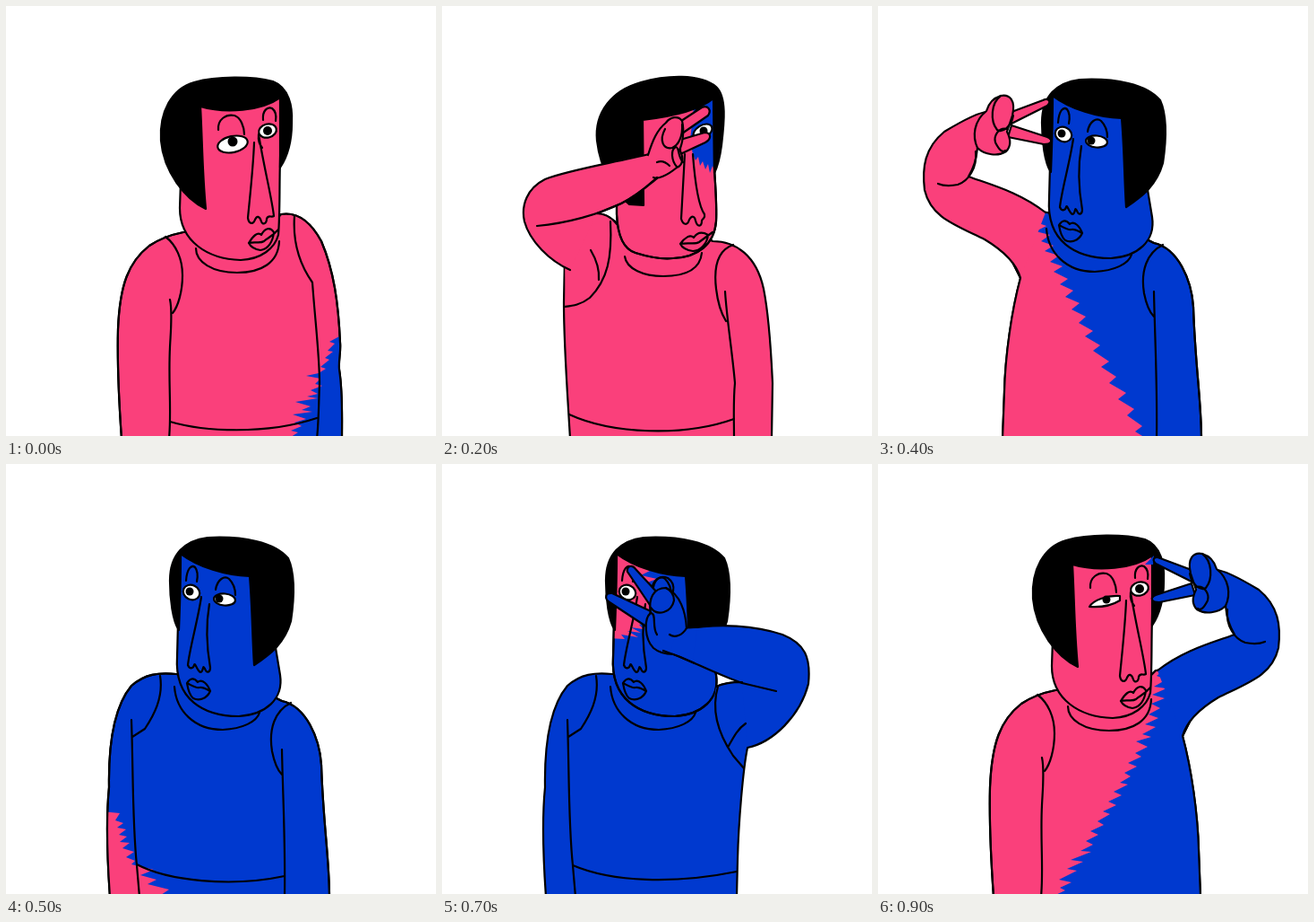
Animation, 480 px wide and 479 px high, one loop 1 s. Source, as an HTML page:

```html
<!DOCTYPE html>
<html lang="en">
<head>
<meta charset="utf-8">
<title>Two-tone salute</title>
<style>
html, body { margin: 0; width: 100%; height: 100%; overflow: hidden; background: #fff; }
svg { display: block; width: 100%; height: 100%; stroke: #000; stroke-width: 2.2; stroke-linecap: round; stroke-linejoin: round; }
.p { fill: #fa407b; }
.b { fill: #0039cf; }
.l { fill: none; }
.n { stroke: none; }
.w { fill: #fff; }
.k { fill: #000; }
.pose { visibility: hidden; animation: show 1s step-end infinite; animation-delay: calc(var(--i) * 100ms - 1s); }
@keyframes show {
  0% { visibility: visible; }
  10%, 100% { visibility: hidden; }
}
</style>
</head>
<body>
<svg viewBox="0 0 480 479" preserveAspectRatio="none">
<defs>
  <!-- torsos -->
  <path id="restR" d="M129 482C126 440 124 400 125 360C127 310 137 285 160 267C172 259 188 254 198 252L230 250 290 250 307 232C325 229 340 240 352 262C366 295 371 330 373 375C374 385 371 395 372 405C376 430 375 455 375 482Z"/>
  <path id="restL" d="M116 482C113 440 111 400 115 360C114 300 125 265 140 247C155 234 170 232 190 234L230 240 290 255 308 264C335 270 350 305 352 335C354 400 361 440 361 482Z"/>
  <path id="openR" d="M129 482C126 440 124 400 125 360C127 310 137 285 160 267C172 259 188 254 198 252L230 250 290 250 310 230 345 227 350 283 340 303C350 340 357 390 358 430L360 482Z"/>
  <path id="openL" d="M139 482L141 430C142 390 149 340 159 303L149 283 154 227 189 230 230 240 290 255 308 264C335 270 350 305 352 335C354 400 361 440 361 482Z"/>
  <path id="frontP" d="M143 482L142 325C142 303 136 284 118 266C100 250 75 244 55 232C35 218 15 196 8 175C-1 150 5 140 30 139C70 140 110 152 140 156L139 188C130 197 115 203 100 205C130 202 165 212 195 243L230 250 285 250 300 262C325 259 352 276 358 318C365 365 368 420 371 482Z"/>
  <path id="frontB" d="M118 482C114 440 114 400 116 345C118 300 130 270 160 254C175 249 188 248 195 247L230 250 285 240 305 244C320 232 345 212 398 207C378 205 360 200 343 192L352 153C390 145 440 140 465 155C480 170 478 200 470 220C455 255 420 270 390 288C365 300 352 310 352 330L350 358V482Z"/>
  <!-- faces -->
  <path id="faceR" d="M195 195L194 225C194 262 225 282 262 283C285 282 300 270 304 255C306 230 305 205 306 170L308 100 215 105Z"/>
  <path id="faceL" d="M194 100L191 215C188 262 220 281 260 281C290 279 310 262 306 235L301 205 272 105Z"/>
  <path id="faceT" d="M224 115L195 190V232C196 255 203 271 216 275C235 281 248 282 258 281C285 280 304 266 306 240C307 220 305 200 304 180V100Z"/>
  <path id="faceP" d="M201 105L195 205V230C196 254 205 272 225 277C235 280 245 280 255 280C290 278 307 258 307 235L302 200 296 110Z"/>
  <path id="faceB" d="M201 102L194 205C193 255 205 281 250 282C290 281 305 258 305 235V200L298 105Z"/>
  <clipPath id="cRestR"><use href="#restR"/></clipPath>
  <clipPath id="cRestL"><use href="#restL"/></clipPath>
  <clipPath id="cOpenR"><use href="#openR"/></clipPath>
  <clipPath id="cOpenL"><use href="#openL"/></clipPath>
  <clipPath id="cFrontP"><use href="#frontP"/></clipPath>
  <clipPath id="cFrontB"><use href="#frontB"/></clipPath>
  <clipPath id="cFaceL"><use href="#faceL"/></clipPath>
  <clipPath id="cFaceT"><use href="#faceT"/></clipPath>
  <clipPath id="cFaceP"><use href="#faceP"/></clipPath>
  <clipPath id="cFaceB"><use href="#faceB"/></clipPath>

  <!-- head turned right, left eye left out -->
  <g id="headR">
    <path class="k" d="M223 226C200 215 176 185 173 150C171 118 185 92 210 85C235 78 275 78 298 84C316 91 320 112 319 130C319 150 314 168 306 180V102C285 117 245 120 217 112C219 145 219 185 223 226Z"/>
    <path class="l" d="M237 138C236 126 246 120 255 122C262 124 266 135 266 143M287 127C286 116 292 112 297 114C301 117 302 122 301 128"/>
    <path class="l" d="M277 152C276 180 272 215 270 236C271 243 276 244 278 238C280 233 283 234 285 240C286 244 291 243 291 237C293 232 296 236 299 234C297 215 288 180 282 143Q281 152 286 158"/>
    <path class="l" d="M271 264C276 256 281 251 285 255C289 247 295 246 299 252C298 262 293 271 284 272C277 271 273 268 271 264C278 262 284 265 288 262C292 258 296 258 304 249"/>
    <ellipse class="w" cx="292" cy="139" rx="10" ry="7.5" transform="rotate(-15 292 139)"/>
    <circle class="k n" cx="292" cy="139" r="5"/>
  </g>
  <g id="wideR">
    <ellipse class="w" cx="253" cy="154" rx="17" ry="9" transform="rotate(-12 253 154)"/>
    <circle class="k n" cx="253" cy="151" r="5.5"/>
  </g>
  <g id="headL">
    <path class="k" d="M277 224C275 195 275 160 272 125C245 124 215 115 195 100C195 130 194 160 193 185C186 175 183 150 183 130C183 100 200 85 225 82C265 80 300 87 315 105C324 125 321 155 318 175C311 200 295 212 277 224Z"/>
    <path class="l" d="M201 130C202 116 207 112 211 115C215 120 214 126 213 131M234 140C236 128 244 124 249 128C254 133 256 140 256 146"/>
    <path class="l" d="M218 148C214 175 205 205 203 224C205 229 209 228 210 224C211 220 213 230 217 232C221 232 219 222 222 228C224 234 228 232 228 227C225 210 222 185 227 156"/>
    <path class="l" d="M202 244C206 238 210 238 214 243C219 239 225 245 228 253C224 262 215 264 209 261C204 257 203 250 202 244C208 247 212 250 216 249C220 248 224 251 228 253"/>
    <ellipse class="w" cx="207" cy="143" rx="9.5" ry="8" transform="rotate(25 207 143)"/>
    <circle class="k n" cx="205" cy="142" r="4.5"/>
    <ellipse class="w" cx="244" cy="151" rx="12" ry="6.5" transform="rotate(5 244 151)"/>
    <circle class="k n" cx="238" cy="150" r="4.5"/>
  </g>

  <!-- shirt and sleeve lines -->
  <g id="linesR">
    <path d="M178 257C190 266 197 282 197 300C197 318 192 335 186 342"/>
    <path d="M212 270C212 285 230 297 258 297C285 297 304 286 305 262"/>
  </g>
  <path id="sleeveR" d="M183 327C186 340 184 360 183 380C181 420 185 450 182 482"/>
  <path id="downR" d="M322 234C320 262 328 288 342 308C345 350 350 390 350 420C349 445 349 465 347 482"/>
  <g id="linesL">
    <path d="M172 236C176 260 165 280 155 295L141 304M140 285C142 340 141 400 146 447L149 482"/>
    <path d="M188 248C190 275 210 296 242 296C264 295 280 287 283 277"/>
  </g>
  <path id="downL" d="M318 266C300 275 293 295 297 320C300 335 304 342 308 346M308 318C309 370 312 420 311 482"/>

  <!-- two-finger hand pointing left, and the arms that carry it -->
  <g id="hand">
    <path d="M350 118L315 105C309 102 305 106 310 111L350 131Z"/>
    <path d="M350 133L310 146C303 149 305 154 314 154L354 146Z"/>
    <path d="M349 122C345 105 352 98 362 100C372 103 376 110 378 117C392 128 394 145 388 158C380 166 365 168 356 162C350 156 351 148 355 140Z"/>
    <path class="l" d="M362 100C373 108 374 128 366 138C360 142 350 134 348 122M355 137C365 135 370 145 368 152C364 160 360 164 357 161"/>
  </g>
  <g id="salute">
    <path d="M312 230C340 208 370 200 398 190C392 180 389 170 388 158L377 118C385 118 400 125 425 140C447 158 450 180 447 205C440 235 415 243 380 260C360 272 345 285 340 303"/>
    <path class="l" d="M390 162C388 180 398 195 410 199C420 201 427 200 432 198"/>
    <use href="#hand"/>
  </g>
  <g id="lift">
    <path d="M364 345C376 385 352 412 325 398C300 385 275 352 260 334L276 310C290 325 304 340 312 346"/>
    <use href="#hand" transform="translate(260 314) rotate(40) translate(-368 -135)"/>
  </g>
</defs>

<g class="pose" style="--i:0">
  <use href="#restR" class="p"/>
  <path class="b n" clip-path="url(#cRestR)" d="M374 367L361 374 367 376 359 384 365 385 356 392 361 394 351 402 357 404 349 409 335 412 351 415 345 421 353 423 340 428 348 432 336 435 348 437 323 441 340 446 330 450 342 452 320 455 335 460 322 464 330 468 318 473 326 475 315 482H380Z"/>
  <g class="l"><use href="#restR"/><use href="#linesR"/><use href="#sleeveR"/><use href="#downR"/><path d="M183 463C220 474 290 478 347 459"/></g>
  <use href="#faceR" class="p"/><use href="#headR"/><use href="#wideR"/>
</g>

<g class="pose" style="--i:1">
  <path class="p" d="M143 482L142 400C126 395 124 370 125 350C129 305 140 280 160 267C172 259 188 254 198 252L230 250 290 250 307 232C325 229 340 240 352 262C366 295 371 330 372 375L371 482Z"/>
  <g class="l"><use href="#linesR"/><use href="#downR"/><path d="M143 456C200 474 290 478 347 459"/></g>
  <use href="#faceR" class="p"/><use href="#headR"/><use href="#wideR"/>
  <use href="#lift" class="p" transform="translate(499) scale(-1 1)"/>
</g>

<g class="pose" style="--i:2">
  <path class="p" d="M143 482C140 430 136 380 136 330L137 280 173 231C183 231 192 238 197 245L230 250 285 250 302 262C328 262 351 278 359 315C366 350 368 400 369 420L368 482Z"/>
  <g class="l">
    <path d="M325 266C308 272 303 290 306 315C308 332 312 343 317 351M316 318C318 350 324 385 327 420C325 440 326 460 326 482"/>
    <path d="M142 455C190 477 270 480 326 460M204 279C206 293 225 301 247 301C270 301 288 295 290 275"/>
  </g>
  <use href="#faceT" class="p"/>
  <path class="b n" clip-path="url(#cFaceT)" d="M304 101L281 112 277 150 280 165 283 172 286 168 288 178 291 173 294 182 297 176 299 186 302 178 306 188Z"/>
  <use href="#faceT" class="l"/>
  <path class="k" d="M225 222L209 221C195 210 177 185 173 150C170 118 190 94 222 85C250 77 288 75 306 90C318 101 315 130 312 155C310 170 307 180 304 186L303 103C285 118 250 124 224 127Z"/>
  <path class="l" d="M281 122C283 115 287 111 291 113M271 165L267 237C269 244 274 245 276 238C279 233 282 234 283 239C285 247 290 246 290 239C292 235 294 237 293 232C288 225 283 205 280 165"/>
  <path class="l" d="M266 265C271 258 277 254 281 258C285 252 290 251 297 255C296 265 288 273 280 273C272 272 268 269 266 265C276 263 282 266 287 263L302 252"/>
  <ellipse class="w" cx="291" cy="140" rx="11.5" ry="7" transform="rotate(-32 291 140)"/>
  <circle class="k n" cx="292" cy="139" r="4.5"/>
  <path class="p n" d="M173 231L188 240C190 280 185 305 165 325L138 333 137 280Z"/>
  <path class="p" d="M173 231C183 231 189 237 196 242M143 294C120 284 98 262 92 240C88 222 95 203 115 193C140 183 190 175 231 165L240 192C232 198 220 210 200 220L173 231"/>
  <path class="p" d="M264 130L290 113C297 110 301 116 297 122L268 142Z"/>
  <path class="p" d="M266 149L293 141C301 141 301 148 294 152L266 165Z"/>
  <path class="p" d="M230 166C235 150 240 138 250 130C255 123 264 122 268 128C271 140 268 155 265 160C271 170 268 178 262 180C250 190 240 193 236 191"/>
  <path class="l" d="M249 137C242 150 247 160 257 158C264 155 269 145 268 132M262 179C256 172 255 160 261 157C265 157 263 168 269 174M240 174Q247 171 254 178"/>
  <path class="l" d="M106 245C140 242 175 232 200 220C220 210 232 198 240 191M188 240C190 280 185 305 165 325C155 333 145 334 137 335M166 272C172 282 176 292 175 305"/>
</g>

<g class="pose" style="--i:3">
  <use href="#frontP" class="p"/>
  <path class="b n" clip-path="url(#cFrontP)" d="M296 262L310 267 298 272 318 275 304 282 314 285 306 290 325 293 310 304 338 301 318 313 345 311 332 322 354 322 340 333 360 332 347 345 366 344 372 340 352 270 325 250Z"/>
  <g class="l">
    <use href="#frontP"/>
    <path d="M11 176C28 198 60 208 100 205M172 217C182 245 176 280 165 305C158 320 150 328 141 329"/>
    <path d="M319 265C305 275 300 300 305 320C308 335 313 345 320 353M319 318C322 370 328 430 330 482"/>
    <path d="M142 454C190 466 270 466 329 457M192 245C192 275 215 299 250 299C270 298 285 290 284 276"/>
  </g>
  <path class="k" d="M196 216C184 208 175 185 174 150C173 115 180 90 205 85C235 79 285 82 310 95C325 103 325 130 322 160C320 178 313 195 302 206L250 140Z"/>
  <use href="#faceP" class="p"/>
  <path class="b n" clip-path="url(#cFaceP)" d="M245 112L229 124 240 128 230 134 185 155 195 172 240 180 226 184 240 188 232 192 244 195 238 199 254 203 246 208 265 210 258 215 276 217 268 222 284 224 276 229 292 230 284 235 298 238 290 242 304 243 298 248 312 252V108Z"/>
  <use href="#faceP" class="l"/>
  <path class="k" d="M201 110C225 122 260 124 296 116L301 206 312 180 310 100 205 95Z"/>
  <path class="l" d="M215 132C218 122 228 120 236 126C239 130 237 135 238 139M262 142C263 128 270 124 277 126C284 130 283 137 282 142"/>
  <path class="l" d="M246 163C244 190 237 215 233 236C236 241 240 240 240 234C243 234 244 245 248 243C251 238 251 231 256 238C258 243 262 240 262 236C256 215 250 195 256 155"/>
  <path class="l" d="M231 259C236 254 243 250 248 254C253 250 261 253 266 258C262 268 256 274 249 275C240 274 234 266 231 259C240 258 241 265 249 265C257 265 257 258 266 258"/>
  <ellipse class="w" cx="223" cy="155" rx="19" ry="9"/>
  <circle class="k n" cx="224" cy="155" r="5.5"/>
  <path class="w" d="M260 154C265 149 280 147 288 148L287 156C278 158 268 157 260 154Z"/>
  <circle class="k n" cx="277" cy="152.5" r="4"/>
  <path class="p n" d="M130 155L148 139 163 131 174 136 184 158 178 181 168 186 139 188 130 190Z"/>
  <path class="p" d="M176 143L222 126C230 124 232 132 225 137L182 157 210 170 233 174C241 177 239 184 232 185C215 185 195 181 178 178"/>
  <path class="l" d="M131 157C140 142 152 131 163 131C171 131 176 135 176 143M160 171C147 172 143 160 147 148C151 136 165 128 173 133C178 140 172 152 164 161M165 180C160 172 161 165 166 166C172 169 172 178 179 178M145 185C151 177 158 179 163 181C168 186 174 184 178 178"/>
</g>

<g class="pose" style="--i:4">
  <use href="#openL" class="b"/>
  <path class="p n" clip-path="url(#cOpenL)" d="M150 228L184 232 174 240 188 245 176 251 192 255 182 262 196 267 186 273 202 278 192 285 206 290 196 296 212 304 203 310 218 317 209 324 225 331 216 338 232 346 224 353 240 362 231 368 248 378 240 384 258 396 249 402 266 413 258 420 277 431 268 438 286 449 278 456 295 468 287 474 300 482H130V300Z"/>
  <g class="l"><use href="#openL"/><use href="#downL"/><path d="M188 248C190 275 210 296 242 296C264 295 280 287 283 277"/></g>
  <use href="#faceL" class="b"/><use href="#headL"/>
  <use href="#salute" class="p" transform="translate(499) scale(-1 1)"/>
</g>

<g class="pose" style="--i:5">
  <use href="#restL" class="b"/>
  <path class="p n" clip-path="url(#cRestL)" d="M108 387L127 389 122 397 131 400 124 405 134 407 126 413 135 415 127 421 138 422 130 428 143 432 134 438 144 442 140 446 165 452 150 458 168 463 158 468 182 474 170 482H105Z"/>
  <g class="l"><use href="#restL"/><use href="#linesL"/><use href="#downL"/><path d="M146 446C180 464 250 472 311 459"/></g>
  <use href="#faceL" class="b"/><use href="#headL"/>
</g>

<g class="pose" style="--i:6">
  <path class="b" d="M116 482C113 440 111 400 115 360C114 300 125 265 140 247C155 234 170 232 190 234L230 240 290 255 308 264C335 270 352 300 364 345C374 380 360 400 331 402L329 482Z"/>
  <g class="l"><use href="#linesL"/><path d="M318 266C300 275 293 295 297 320C300 335 304 342 312 346M146 447C190 466 260 468 329 455"/></g>
  <use href="#faceL" class="b"/><use href="#headL"/>
  <use href="#lift" class="b"/>
</g>

<g class="pose" style="--i:7">
  <path class="b" d="M116 482C113 440 111 400 115 360C114 300 125 265 140 247C155 234 170 232 190 234L230 240 290 250 306 248C315 244 322 243 330 243L345 280 341 316C336 340 331 400 330 440L329 482Z"/>
  <g class="l"><use href="#linesL"/><path d="M146 447C190 466 260 468 329 454"/></g>
  <use href="#faceL" class="b"/>
  <path class="p n" clip-path="url(#cFaceL)" d="M190 98L232 119 222 124 240 128 229 132 232 175 220 179 225 184 211 182 222 188 207 186 219 193 200 190 204 195 188 194Z"/>
  <use href="#faceL" class="l"/><use href="#headL"/>
  <path class="b n" d="M330 242L306 248C300 275 308 300 325 325L341 316 370 285V240ZM268 200H290V230H268Z"/>
  <path class="b" d="M341 316C370 310 400 280 409 245C412 215 405 200 380 190C350 180 310 177 270 184L245 207C270 215 305 234 335 244"/>
  <path class="l" d="M335 244L373 253M306 248C315 244 322 243 335 243M308 248C300 275 308 300 325 325L337 339M339 289C330 295 325 305 320 314"/>
  <path class="b" d="M240 143L216 117C213 112 206 113 207 120L232 157Z"/>
  <path class="b" d="M233 164L190 144C182 143 181 150 187 154L228 181Z"/>
  <path class="b" d="M233 166C230 150 236 138 250 138C266 145 272 165 273 183C270 190 266 192 262 193L258 212C250 212 242 210 236 205C226 195 225 172 233 166Z"/>
  <path class="b n" d="M262 184L285 183 280 218 255 210Z"/>
  <path class="l" d="M247 208Q265 214 282 222M233 166C240 166 234 182 240 190M233 160C240 170 256 166 259 152C259 146 256 141 250 138M273 183C268 191 260 194 254 190M236 137C238 127 245 124 252 127C258 131 259 137 258 142"/>
</g>

<g class="pose" style="--i:8">
  <use href="#frontB" class="b"/>
  <path class="p n" clip-path="url(#cFrontB)" d="M200 244L186 255 199 257 184 262 197 265 180 268 193 273 170 277 187 282 165 285 180 291 158 296 168 301 150 305 160 310 142 315 157 323 135 324 148 331 130 333 140 338 112 349 100 300 150 240Z"/>
  <g class="l">
    <use href="#frontB"/>
    <path d="M343 192C370 205 410 210 446 206M313 240C311 280 325 330 350 357"/>
    <path d="M172 252C172 285 165 305 148 322M147 318C148 360 143 390 150 440L156 482"/>
    <path d="M152 455C200 468 290 470 350 457M194 265C197 288 215 299 247 299C275 298 292 285 292 263"/>
  </g>
  <path class="k" d="M194 214C178 200 170 170 169 140C169 108 180 88 205 82C240 77 285 80 305 92C320 103 324 130 321 165C317 190 310 203 298 208L250 140Z"/>
  <use href="#faceB" class="b"/>
  <path class="p n" clip-path="url(#cFaceB)" d="M190 98L265 118 246 122 262 126 250 130 262 136 310 146 308 165 260 180 273 185 256 187 268 192 250 197 258 200 242 206 250 209 232 215 245 217 222 222 235 226 208 232 228 237 205 240 220 244 200 248 210 252 190 256Z"/>
  <use href="#faceB" class="l"/>
  <path class="k" d="M200 107C225 118 265 126 298 111L302 206 314 180 305 95 205 92Z"/>
  <path class="l" d="M214 137C216 127 224 122 231 125C237 129 238 134 238 139M268 128C270 120 280 120 284 130"/>
  <path class="l" d="M246 148C244 185 239 215 234 235C237 241 241 240 242 235C244 235 245 245 249 243C252 240 252 232 256 238C258 243 260 239 260 234C257 215 252 195 255 146"/>
  <path class="l" d="M230 260C236 254 241 249 246 254C250 250 257 252 261 261C257 268 252 275 245 276C237 274 234 268 230 260C238 261 241 265 246 264C252 265 255 261 261 261"/>
  <path class="w" d="M204 152C215 148 230 148 242 150L241 158C228 160 212 159 204 152Z"/>
  <circle class="k n" cx="225" cy="154" r="4.5"/>
  <ellipse class="w" cx="279" cy="153" rx="18" ry="9"/>
  <circle class="k n" cx="278" cy="152" r="5.5"/>
  <path class="b" d="M315 137L266 128C258 127 256 135 265 138L312 149Z"/>
  <path class="b" d="M307 164L262 174C253 178 256 184 265 184L311 177Z"/>
  <path class="b" d="M316 138C322 130 335 130 342 137C355 150 362 155 359 165C355 180 350 190 340 193C325 192 314 187 312 178L306 163C309 155 312 150 316 138Z"/>
  <path class="l" d="M313 172C310 160 318 154 322 161C325 168 320 174 313 172M316 140C314 150 318 157 326 157C334 160 330 170 343 178M322 163C326 170 328 178 336 178"/>
</g>

<g class="pose" style="--i:9">
  <use href="#openR" class="p"/>
  <path class="b n" clip-path="url(#cOpenR)" d="M324 226L311 236 322 240 308 248 322 250 306 257 320 261 305 267 315 272 302 279 313 283 298 290 310 293 295 301 305 304 288 309 301 315 287 322 294 326 279 333 289 337 275 344 282 348 270 355 279 357 263 365 272 369 257 376 266 380 251 387 259 390 245 398 252 402 237 409 246 413 232 420 240 424 226 431 238 432 215 441 229 443 211 451 222 453 202 463 216 466 203 472 209 475 194 482H370V226Z"/>
  <g class="l"><use href="#openR"/><use href="#linesR"/><use href="#sleeveR"/></g>
  <use href="#faceR" class="p"/><use href="#headR"/>
  <path class="w" d="M236 159C240 152 255 146 270 147V152C262 157 250 160 236 159Z"/>
  <circle class="k n" cx="255" cy="151" r="4.5"/>
  <path class="b n" d="M298 112L308 102 307 112Z"/>
  <use href="#salute" class="b"/>
</g>
</svg>
</body>
</html>
```
